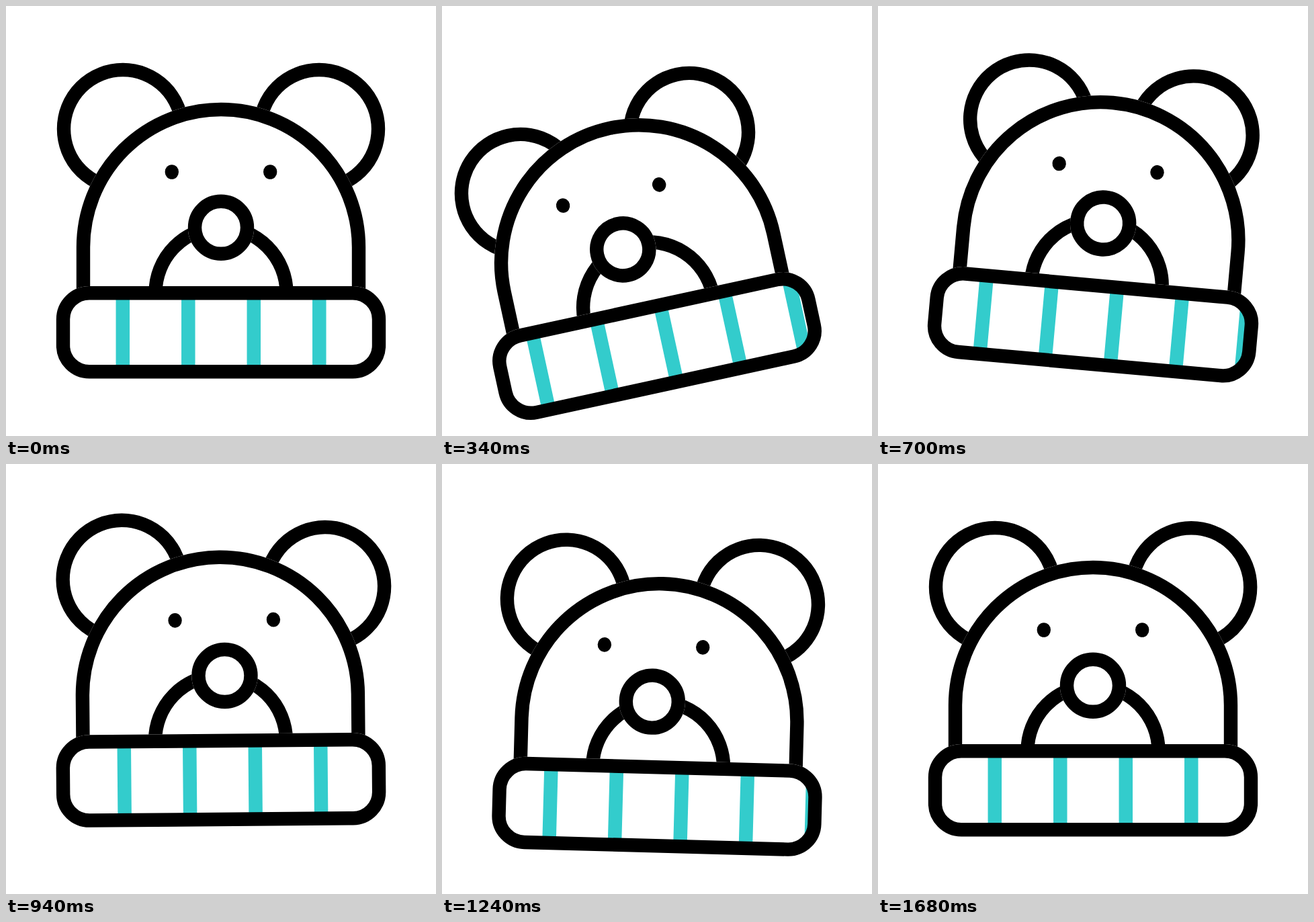
Animation, 640 px wide and 640 px high, one loop 2400 ms. Source, as an HTML page:

```html
<!DOCTYPE html>
<html>
<head>
<meta charset="utf-8">
<title>Bear hat</title>
<style>
  html, body { margin: 0; width: 100%; height: 100%; overflow: hidden; background: #fff; }
  svg { display: block; width: 100vw; height: 100vh; }
  .halo { fill: #fff; stroke: #fff; stroke-width: 20.4; }
  .line { fill: none; stroke: #000; stroke-width: 20.4; }
</style>
</head>
<body>
<svg viewBox="0 0 640 640">
  <defs>
    <circle id="earShape" r="88"/>
    <path id="domeShape" d="M-205-55V-126.7A205 205 0 0 1 205-126.7V-55"/>
    <circle id="noseShape" cy="-155.9" r="39"/>
    <ellipse id="eye" cy="-238.7" rx="10.2" ry="10.8"/>
    <rect id="bandShape" x="-235" y="-58.5" width="470" height="117" rx="39"/>
    <clipPath id="inside"><use href="#bandShape"/></clipPath>
  </defs>
  <g id="hat">
    <use id="earL" href="#earShape" class="line"/>
    <use id="earR" href="#earShape" class="line"/>
    <use href="#domeShape" class="halo"/>
    <use href="#domeShape" class="line"/>
    <path class="line" d="M-97.5-58.5A97.5 97.5 0 0 1 97.5-58.5"/>
    <g id="face">
      <use href="#noseShape" class="halo"/>
      <use href="#noseShape" class="line"/>
      <use href="#eye" x="-73.2"/>
      <use href="#eye" x="73.2"/>
    </g>
    <use href="#bandShape" class="halo"/>
    <g clip-path="url(#inside)">
      <path id="stripes" stroke="#3cc" stroke-width="20.5"/>
    </g>
    <use href="#bandShape" class="line"/>
  </g>
</svg>
<script>
const LOOP = 2400, STEP = 20, TICKS_PER_MS = 0.06, REST = 100;
const EAR_SWING = 2.4, EAR_LAG = 5;

const $ = id => document.getElementById(id);
const move = (id, x, y) => $(id).setAttribute('transform', `translate(${x} ${y})`);

const clamp = u => Math.min(1, Math.max(0, u));
const smooth = u => u * u * (3 - 2 * u);
const ramp = (t, from, to) => smooth(clamp((t - from) / (to - from)));

// Eases from zero through [tick, value] peaks and settles softly back to zero.
const sway = (...peaks) => t => {
  let start = 0, value = 0;
  for (const [end, peak] of peaks) {
    value += (peak - value) * ramp(t, start, end);
    if (t < end) return value;
    start = end;
  }
  return value * (1 - smooth(clamp((t - start) / (REST - start)) ** 0.7));
};

const turn = sway([28, -15], [48, 10.7], [61, -5], [77.6, 2.25]);
const lift = sway([28, 24.8], [49, -24], [76.6, 25]);
const look = sway([28, -23.2], [51, 14.3], [67.5, -15.5], [88, 0]);
const slide = sway([28, -38], [56, 2.5], [66, -18.8]);
const tuck = t => 26 * ramp(t, 0, 25) * (1 - ramp(t, 35, 62));

// Ears sink towards the head and swing along its rim as the hat turns.
function placeEar(id, side, sink, swing) {
  move(id, side * 146 + (swing - side * sink) * Math.SQRT1_2,
    -302.7 + (sink + side * swing) * Math.SQRT1_2);
}

function draw(t) {
  $('hat').setAttribute('transform', `translate(320 ${485.7 + lift(t)}) rotate(${turn(t)})`);
  placeEar('earL', -1, tuck(t), EAR_SWING * turn(t));
  placeEar('earR', 1, tuck(t), EAR_SWING * turn(t - EAR_LAG));
  move('face', look(t), tuck(t) / 5);
  move('stripes', slide(t), 0);
}

let stripePath = '';
for (let i = 0; i < 5; i++) stripePath += `M${-146.2 + 97.5 * i}-58v116`;
$('stripes').setAttribute('d', stripePath);

const start = performance.now();
function frame() {
  const ms = (performance.now() - start) % LOOP;
  draw(Math.floor(ms / STEP) * STEP * TICKS_PER_MS);
  requestAnimationFrame(frame);
}
frame();
</script>
</body>
</html>
```
